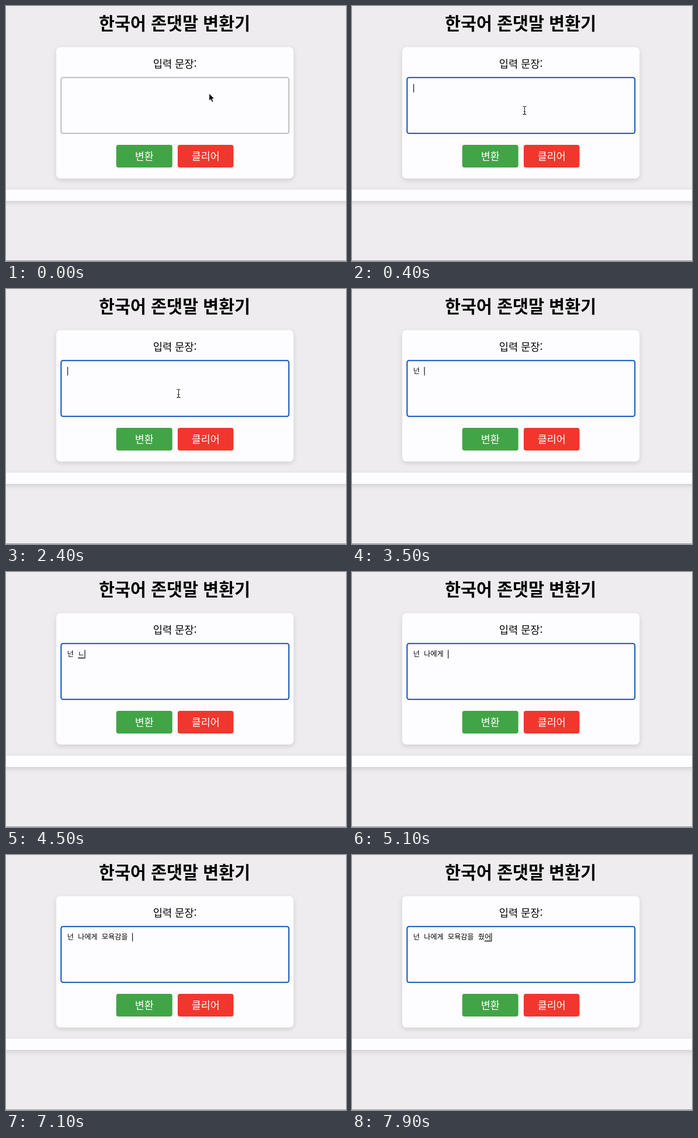
An HTML page for the animation above (8000 ms loop, 600 px wide and 450 px high).

```html
<!DOCTYPE html>
<html lang="ko">
<head>
<meta charset="utf-8">
<style>
  html, body { margin: 0; width: 100%; height: 100%; overflow: hidden; background: #eeecee; }
  svg { display: block; width: 600px; height: 450px; }
  text { font-family: "Noto Sans CJK KR", "Noto Sans CJK", "Noto Sans CJK JP", sans-serif; }
  .mid { text-anchor: middle; }
  .lift { filter: drop-shadow(0 3px 4px rgba(0, 0, 0, .13)); }
  #typed { font: 12.5px "DejaVu Sans Mono", "Noto Sans CJK KR", "Noto Sans CJK", monospace; white-space: pre; }
</style>
</head>
<body>
<svg viewBox="0 0 600 450">
  <rect width="600" height="450" fill="#eeecee"/>
  <text class="mid" x="297.5" y="42" font-size="30.2" font-weight="700">한국어 존댓말 변환기</text>

  <rect class="lift" x="88.5" y="72.5" width="419" height="232" rx="8" fill="#fdfcfe"/>
  <rect class="lift" x="-20" y="324" width="640" height="20" fill="#fdfcfe"/>
  <rect y="449" width="600" height="1" fill="#8f8e90"/>

  <text class="mid" x="298" y="109.3" font-size="18.2">입력 문장:</text>
  <rect id="box" x="97.2" y="126.2" width="402" height="98.6" rx="3.5" fill="#fdfcfe" stroke-width="2"/>

  <rect x="194.5" y="245" width="99" height="40" rx="4" fill="#41a446"/>
  <rect x="303" y="245" width="98.5" height="40" rx="4" fill="#f1372d"/>
  <g class="mid" font-size="18" fill="#fff">
    <text x="244" y="271.7">변환</text>
    <text x="352.3" y="271.7">클리어</text>
  </g>

  <text id="typed" x="108" y="149"></text>
  <rect id="under" y="151" width="11.5" height="1.5" fill="#111"/>
  <rect id="caret" y="137.5" width="1.2" height="15" fill="#111"/>

  <path id="arrow" d="M0 0V13.6L3.1 10.8L5.3 15.6L7.7 14.5L5.6 9.8H9.6Z" stroke="#fff" stroke-width="1" stroke-linejoin="round"/>
  <g id="beam" fill="none" stroke-linecap="round">
    <path d="M-2.8 -7.3Q0 -7.3 0 -5V5Q0 7.3 -2.8 7.3M2.8 -7.3Q0 -7.3 0 -5M0 5Q0 7.3 2.8 7.3M-1.5 2H1.5" stroke="#fff" stroke-width="2.4"/>
    <path d="M-2.8 -7.3Q0 -7.3 0 -5V5Q0 7.3 -2.8 7.3M2.8 -7.3Q0 -7.3 0 -5M0 5Q0 7.3 2.8 7.3M-1.5 2H1.5" stroke="#222" stroke-width="1.1"/>
  </g>
</svg>
<script>
const LOOP = 8000, FOCUS = 400, BLINK = 500, LEFT = 108;
const GLYPH = 11.5, SPACE = 7.5;
const $ = id => document.getElementById(id);
const box = $('box'), typed = $('typed'), under = $('under'), caret = $('caret');
const arrow = $('arrow'), beam = $('beam');

// Each word: text before it, then [time, composing text] per key press.
const words = [
  ['', [[2700, 'ㄴ'], [2800, '너'], [3000, '넌'], [3500, '넌 ']]],
  ['넌 ', [[4500, 'ㄴ'], [4600, '나'], [4700, '낭'], [4800, '나에'], [4900, '나엑'], [5000, '나에게'], [5100, '나에게 ']]],
  ['넌 나에게 ', [[5500, 'ㅁ'], [5600, '모'], [5900, '몽'], [6000, '모요'], [6200, '모욕'],
    [6400, '모욕ㄱ'], [6500, '모욕가'], [6600, '모욕감'], [6800, '모욕감ㅇ'], [6900, '모욕감으'],
    [7000, '모욕감을'], [7100, '모욕감을 ']]],
  ['넌 나에게 모욕감을 ', [[7200, 'ㅈ'], [7300, '주'], [7400, '줘'], [7500, '줬'], [7700, '줬ㅇ'], [7800, '줬어']]]
];
const keys = [[FOCUS, '']].concat(...words.map(([head, steps]) => steps.map(([t, s]) => [t, head + s])));

const show = (el, on) => el.setAttribute('visibility', on ? 'visible' : 'hidden');
const place = (el, x, y) => el.setAttribute('transform', `translate(${x} ${y})`);
const measure = s => [...s].reduce((w, c) => w + (c === ' ' ? SPACE : GLYPH), 0);

function draw(t) {
  const focused = t >= FOCUS;
  const [last, text] = keys.filter(k => k[0] <= t).pop() || [0, ''];
  const end = LEFT + measure(text);

  box.setAttribute('stroke', focused ? '#0b50bd' : '#bcbbbd');
  typed.textContent = text;
  under.setAttribute('x', end - GLYPH);
  show(under, text && !text.endsWith(' '));
  caret.setAttribute('x', end + .2);
  show(caret, focused && Math.floor((t - last) / BLINK) % 2 === 0);

  const p = Math.min(1, Math.max(0, t / 300));
  const ease = p * p * (3 - 2 * p);
  place(arrow, 358.3, 154);
  place(beam, 358 - 53.5 * ease, 161 + 23.3 * ease);
  show(arrow, t < 100);
  show(beam, t >= 100 && t < keys[1][0]);
}

function tick() {
  draw(performance.now() % LOOP);
  requestAnimationFrame(tick);
}
tick();
</script>
</body>
</html>
```
